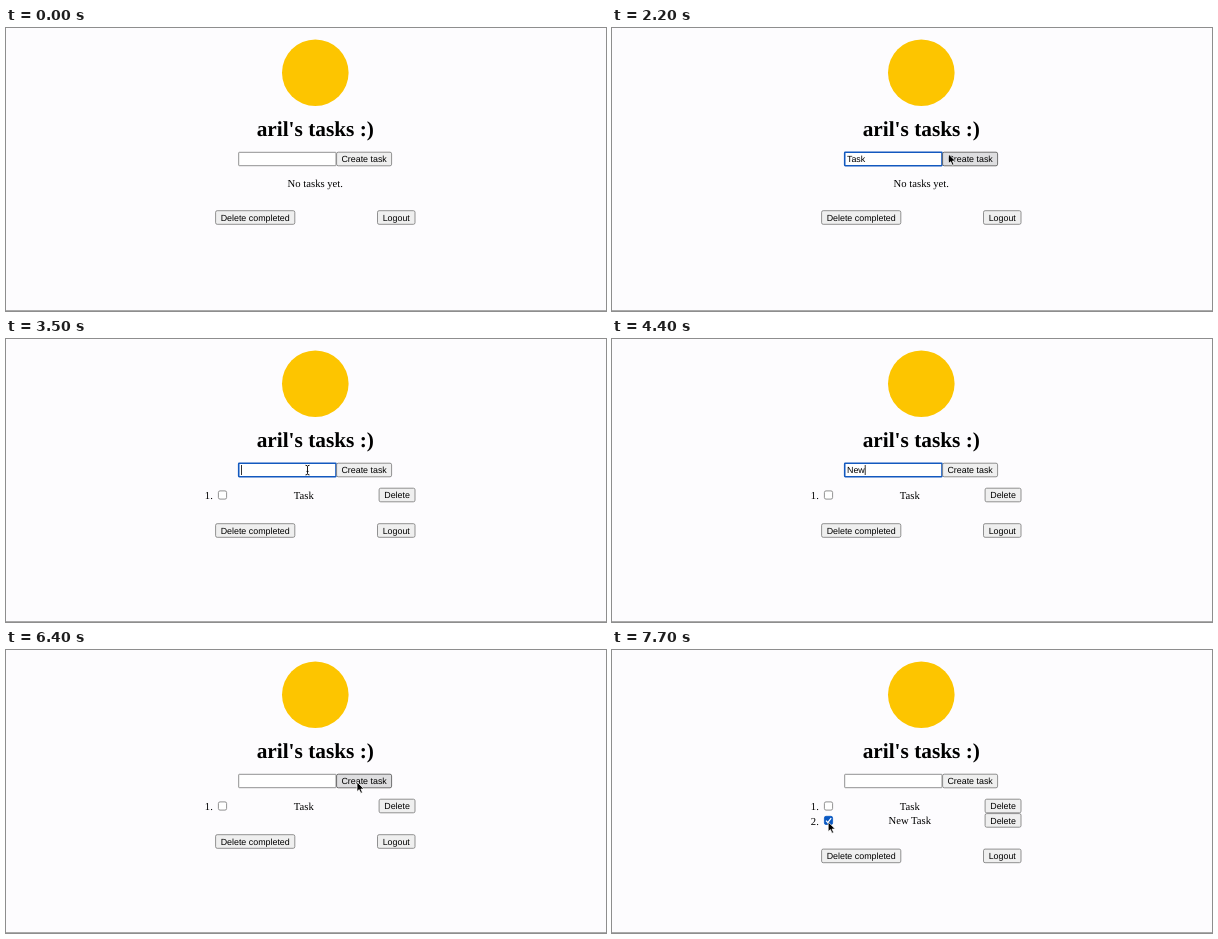
Write an HTML page that moves like this. It is 600x283 px and loops after 8 s.

```html
<!DOCTYPE html>
<html lang="en">
<head>
<meta charset="utf-8">
<title>Task list</title>
<style>
  html, body { margin: 0; width: 100%; height: 100%; overflow: hidden; background: #fdfcfe; }
  svg { display: block; width: 100%; height: 100%; }
  text { font: 10.67px "Liberation Serif", "Times New Roman", serif; fill: #000; text-rendering: geometricPrecision; white-space: pre; }
  .title { font-size: 21.33px; font-weight: bold; }
  .mid { text-anchor: middle; }
  .ui { font: 8.89px "Liberation Sans", Arial, sans-serif; }
  .button rect { fill: #efefef; stroke: #767676; stroke-width: .8; }
  .button.hover rect { fill: #dedee0; stroke: #4f4f4f; }
  .field, .box { fill: #fff; stroke: #767676; stroke-width: .8; }
  .field.focus { stroke: #1359bf; stroke-width: 1.6; }
  .checked .box { fill: #0a58c2; stroke: #0a58c2; }
  .tick { fill: none; stroke: #fff; stroke-width: 1.3; visibility: hidden; }
  .checked .tick { visibility: visible; }
</style>
</head>
<body>
<svg viewBox="0 0 600 283" id="stage"></svg>
<script>
const LOOP = 8000, STEP = 100;

const button = (id, x, y, w, label) => `
  <g class="button" id="${id}">
    <rect x="${x}" y="${y}" width="${w}" height="13.6" rx="1.6"/>
    <text class="ui mid" x="${x + w / 2}" y="${y + 10}">${label}</text>
  </g>`;

const row = (n, label) => {
  const y = 156 + (n - 1) * 14.4;
  return `
  <g id="row${n}">
    <text x="198.8" y="${y + 4.4}">${n}.</text>
    <rect class="box" x="212.4" y="${y - 4.1}" width="8.2" height="8.2" rx="1.6"/>
    <path class="tick" d="M214 ${y + .2}l1.8 2 3.4-4.4"/>
    <text class="mid" x="297.8" y="${y + 3.8}">${label}</text>
    ${button("delete" + n, 373.1, y - 6.8, 35.9, "Delete")}
  </g>`;
};

document.getElementById("stage").innerHTML = `
  <rect width="600" height="283" fill="#fdfcfe"/>
  <rect y="282" width="600" height="1" fill="#aaa"/>
  <circle cx="309.3" cy="44.8" r="33.3" fill="#fdc500"/>
  <text class="title mid" x="309.3" y="108.3">aril's tasks :)</text>
  <rect class="field" id="field" x="232.7" y="124.3" width="97.3" height="13.4" rx=".6"/>
  <text class="ui" id="typed" x="235" y="134"></text>
  <rect id="caret" y="126" width=".8" height="10"/>
  ${button("create", 330.6, 124.2, 55, "Create task")}
  <text class="mid" id="empty" x="309.3" y="158.8">No tasks yet.</text>
  ${row(1, "Task")}${row(2, "New Task")}
  <g id="footer">
    ${button("clear", 209.6, 182.7, 79.2, "Delete completed")}
    ${button("logout", 371.5, 182.7, 37.5, "Logout")}
  </g>
  <path id="arrow" d="M0 0V9.6L2.2 7.6 3.8 11.2 5.4 10.5 3.9 7H7Z" fill="#000" stroke="#fff" stroke-width=".7"/>
  <path id="beam" d="M-2-4.7Q0-4.7 0-3.4Q0-4.7 2-4.7M0-3.4V3.6M-2 4.9Q0 4.9 0 3.6Q0 4.9 2 4.9M-1 1.4H1"
    fill="none" stroke="#000" stroke-width=".9"/>`;

const $ = id => document.getElementById(id);
const within = (t, spans) => spans.some(([from, to]) => t >= from && t < to);
const show = (id, on) => $(id).setAttribute("visibility", on ? "visible" : "hidden");
const moveTo = (id, x, y) => $(id).setAttribute("transform", `translate(${x} ${y})`);

// Each stroke is a run of [time, x, y]; the pointer is hidden between strokes.
const strokes = [
  { end: 1000, points: [[100, 296, 171], [400, 295, 140], [600, 298, 131]] },
  { end: 3900, points: [[1900, 300, 131], [2200, 336.5, 126], [2400, 344, 130],
    [3100, 344, 130], [3500, 301.5, 131]] },
  { end: LOOP, points: [[5500, 301.5, 131], [5800, 318, 131], [5900, 318, 131],
    [6200, 351, 132], [6600, 351, 132], [7000, 285, 158], [7300, 220, 177], [7500, 216.2, 172]] }
];

const typing = [
  { text: "Task", keys: [1200, 1400, 1600, 1700], clear: 2500 },
  { text: "New Task", keys: [4000, 4200, 4300, 4500, 4700, 4900, 5000, 5200], clear: 6300 }
];

const focusSpans = [[600, 2500], [3400, 6300]];
const caretSpans = [[600, 1900], [3400, 5500]];

function pointerAt(t) {
  const stroke = strokes.find(s => t >= s.points[0][0] && t < s.end);
  if (!stroke) return null;
  const { points } = stroke;
  const next = points.findIndex(p => p[0] > t);
  if (next < 0) return points.at(-1).slice(1);
  const [a, b] = [points[next - 1], points[next]];
  const k = (t - a[0]) / (b[0] - a[0]), ease = k * k * (3 - 2 * k);
  return [1, 2].map(i => a[i] + (b[i] - a[i]) * ease);
}

function typedAt(t) {
  const entry = typing.find(e => t >= e.keys[0] && t < e.clear);
  return entry ? entry.text.slice(0, entry.keys.filter(k => k <= t).length) : "";
}

function render(t) {
  const tasks = (t >= 2600) + (t >= 6500);
  show("empty", tasks === 0);
  for (const n of [1, 2]) $("row" + n).style.display = tasks >= n ? "" : "none";
  moveTo("footer", 0, [0, 2, 16.4][tasks]);
  $("row2").classList.toggle("checked", t >= 7600);

  $("field").classList.toggle("focus", within(t, focusSpans));
  $("typed").textContent = typedAt(t);
  $("caret").setAttribute("x", 235 + $("typed").getComputedTextLength());
  show("caret", within(t, caretSpans));

  const pointer = pointerAt(t);
  const [x, y] = pointer || [0, 0];
  const inBar = y > 124 && y < 138;
  const overField = inBar && x > 232 && x < 330;
  $("create").classList.toggle("hover", inBar && x >= 330 && x < 386);
  show("beam", pointer && overField);
  show("arrow", pointer && !overField);
  moveTo("beam", x, y);
  moveTo("arrow", x, y);
}

const start = performance.now();
function tick() {
  const t = (performance.now() - start) % LOOP;
  render(Math.floor(t / STEP) * STEP);
  requestAnimationFrame(tick);
}
tick();
</script>
</body>
</html>
```
